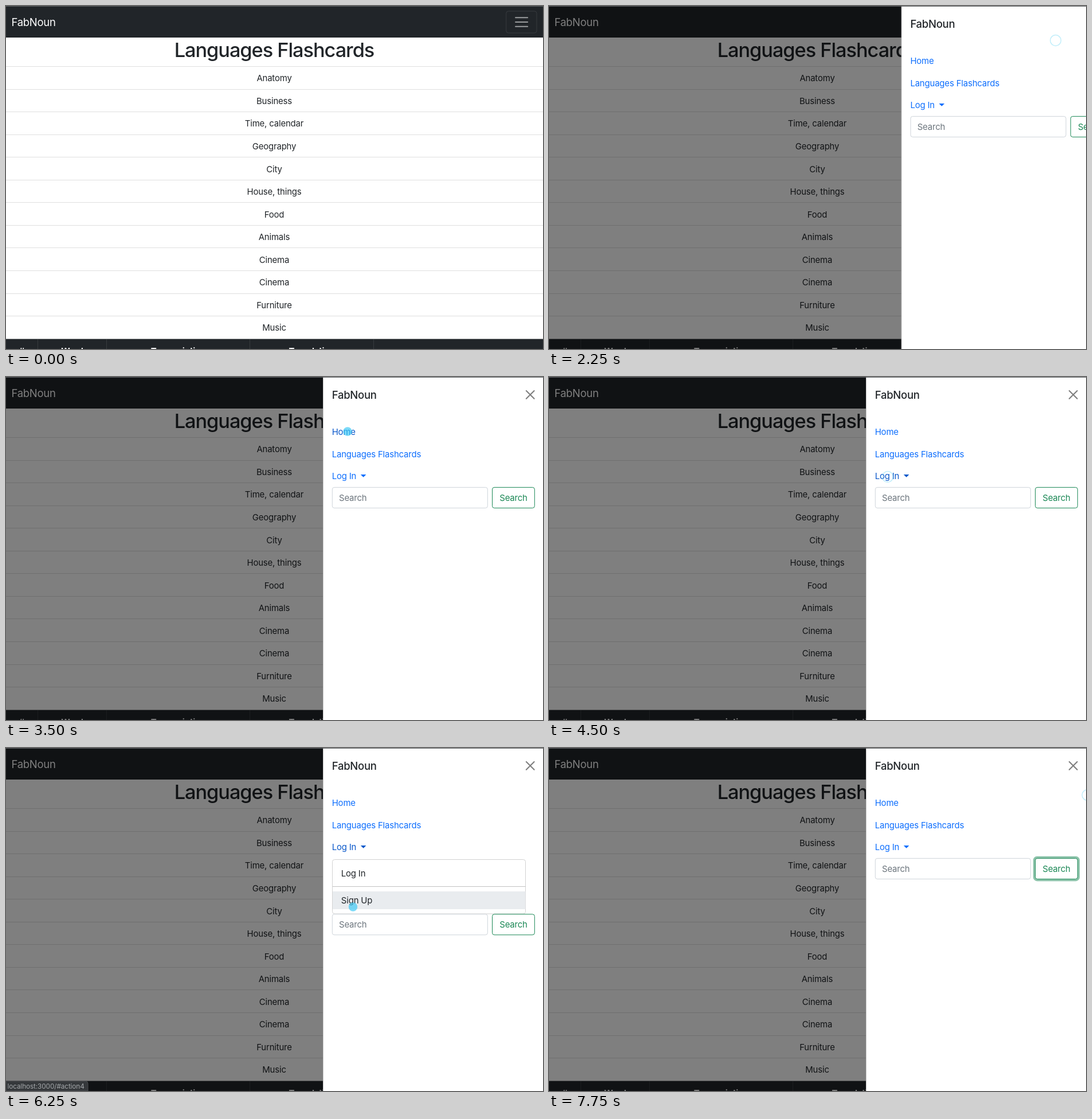
An HTML page for the animation above (8000 ms loop, 937 px wide and 598 px high).

```html
<!DOCTYPE html>
<html lang="en">
<head>
<meta charset="utf-8">
<title>Languages Flashcards</title>
<style>
  html, body { margin: 0; width: 100%; height: 100%; overflow: hidden; background: #fff; }
  svg { display: block; width: 100vw; height: 100vh; }
  text { font: 14.9px Inter, sans-serif; font-optical-sizing: none; letter-spacing: -.01em; fill: #212529; white-space: pre; }
  .mid { text-anchor: middle; }
  .title { font-size: 34.3px; font-weight: 500; letter-spacing: -.03em; }
  .brand { font-size: 18.5px; letter-spacing: -.015em; }
  .head { font-weight: 700; fill: #fff; }
  .link { fill: #0d6efd; }
  .link.on { fill: #0a58ca; }
  .hint { fill: #6c757d; }
  .status { font-size: 11.8px; fill: #a4a7aa; }
  .hover { fill: #e9ecef; }
</style>
</head>
<body>
<svg viewBox="0 0 937 598">
  <g id="page">
    <rect width="937" height="598" fill="#fff"/>
    <rect width="937" height="55" fill="#212529"/>
    <text class="brand" x="9.5" y="34.6" style="fill:#fff">FabNoun</text>
    <rect id="togglerFocus" x="870.8" y="7" width="57.2" height="42" rx="5.5" fill="none" stroke="#9b9d9f" stroke-width="3.9"/>
    <rect x="872.8" y="9" width="53.2" height="38" rx="3.9" fill="none" stroke="#fff" stroke-opacity=".1"/>
    <path d="M889 20.3h21.2M889 28h21.2M889 35.7h21.2" stroke="#9b9d9f" stroke-width="1.9" stroke-linecap="round"/>
    <text class="title mid" x="468" y="89.3">Languages Flashcards</text>
    <g id="rows"></g>
    <rect y="580.5" width="937" height="18" fill="#212529"/>
    <path d="M55.5 581v17M175.5 581v17M425.5 581v17M641.5 581v17" stroke="#373b3e"/>
    <g id="heads"></g>
  </g>
  <rect id="backdrop" width="937" height="598" opacity=".5"/>
  <g id="panel">
    <rect x="553" width="384" height="598" fill="#fff"/>
    <path d="M553.5 0v598" stroke="#000" stroke-opacity=".2"/>
    <text class="brand" x="568.7" y="37.6" style="font-weight:500">FabNoun</text>
    <path d="M907.8 24l13.8 13.8M921.6 24l-13.8 13.8" stroke="#7f7f7f" stroke-width="2.1" stroke-linecap="round"/>
    <text class="link" id="home" x="568.7" y="101.4">Home</text>
    <text class="link" id="cards" x="568.7" y="139.9">Languages Flashcards</text>
    <g class="link" id="login">
      <text class="link" x="568.7" y="178.4">Log In</text>
      <path d="M618.8 170h9.6l-4.8 4.8z"/>
    </g>
    <g id="menu">
      <rect x="569.5" y="194.5" width="337" height="94.5" rx="3.9" fill="#fff" stroke="#d2d2d2"/>
      <rect class="hover" id="item0" x="570" y="202.5" width="336.5" height="31"/>
      <rect class="hover" id="item1" x="570" y="250" width="336.5" height="31"/>
      <path d="M570 241.5h336.5" stroke="#c3c3c3"/>
      <text x="584.8" y="223.8">Log In</text>
      <text x="584.8" y="271.2">Sign Up</text>
    </g>
    <g id="search">
      <rect x="569.3" y="192.4" width="271" height="36" rx="3.6" fill="#fff" stroke="#ced4da"/>
      <text class="hint" x="581" y="216">Search</text>
      <rect id="searchFocus" x="846.7" y="190.6" width="77.4" height="39.6" rx="5" fill="none" stroke="#8cc3aa" stroke-width="3.9"/>
      <rect id="searchButton" x="848.5" y="192.4" width="73.8" height="36" rx="3.6" stroke="#198754"/>
      <text id="searchLabel" class="mid" x="885.5" y="216">Search</text>
    </g>
  </g>
  <g id="status">
    <path d="M0 581h139q4 0 4 4v13H0z" fill="#35383b" stroke="#484b4e"/>
    <text class="status" id="statusText" x="2.5" y="593.8"></text>
  </g>
  <path d="M0 .5h937" stroke="#5b5e61"/>
  <circle id="cursor"/>
</svg>
<script>
const LOOP = 8000;
const $ = id => document.getElementById(id);
const show = (id, on) => { $(id).style.display = on ? '' : 'none'; };
const label = (cls, x, y, text) => `<text class="${cls}" x="${x}" y="${y}">${text}</text>`;

const topics = ['Anatomy', 'Business', 'Time, calendar', 'Geography', 'City', 'House, things',
  'Food', 'Animals', 'Cinema', 'Cinema', 'Furniture', 'Music'];
$('rows').innerHTML = topics.map((topic, i) => {
  const y = 105.5 + i * 39.55;
  return `<path d="M0 ${Math.floor(y) + .5}h937" stroke="#dfdfdf"/>` + label('mid', 468, y + 25.8, topic);
}).join('');
$('heads').innerHTML = [['#', 27.5], ['Word', 115.5], ['Transcription', 300.5], ['Translation', 533.5]]
  .map(([text, x]) => label('head mid', x, 606.6, text)).join('');

// Pointer stops: time, x, y, pressed
const stops = [
  [500, 884.5, 42.5], [750, 884.5, 42.5, 1], [1250, 884, 60],
  [2750, 843, 81], [3000, 720, 120], [3250, 596, 95], [3500, 596, 95, 1],
  [3750, 594, 120], [4000, 592, 137], [4250, 592, 137, 1],
  [4500, 591, 174], [4750, 591, 174, 1], [5250, 591, 200],
  [5500, 600, 222], [5750, 600, 222, 1], [6000, 605.5, 277], [6250, 605.5, 277, 1],
  [6500, 605.5, 277], [6750, 740, 240], [7000, 885, 211], [7250, 885, 211, 1],
  [7500, 912, 150], [7750, 939.5, 82]
];

function drawCursor(t) {
  const stop = stops.findLast(s => s[0] <= t);
  show('cursor', stop);
  if (!stop) return;
  const [, x, y, pressed] = stop;
  const look = pressed
    ? { r: 7.7, fill: 'rgba(60,200,245,.68)', stroke: 'none' }
    : { r: 9.4, fill: 'none', stroke: 'rgba(80,205,240,.35)', 'stroke-width': 1.5 };
  for (const [name, value] of Object.entries({ cx: x, cy: y, ...look })) $('cursor').setAttribute(name, value);
}

function draw(t) {
  const during = (from, to = LOOP) => t >= from && t < to;

  show('togglerFocus', during(1750));
  $('togglerFocus').style.opacity = t < 2000 ? .5 : 1;
  show('backdrop', during(2250));
  show('panel', during(2250));
  $('panel').setAttribute('transform', `translate(${t < 2500 ? 61.7 : 0} 0)`);

  $('home').classList.toggle('on', during(3250, 3750));
  $('cards').classList.toggle('on', during(3750, 4500));
  $('login').classList.toggle('on', during(4500, 6750));
  $('login').firstElementChild.classList.toggle('on', during(4500, 6750));

  const open = during(5000, 6750);
  show('menu', open);
  show('item0', during(5500, 6000));
  show('item1', during(6000, 6750));
  $('search').setAttribute('transform', `translate(0 ${open ? 97.4 : 0})`);

  const filled = during(7000, 7500);
  show('searchFocus', during(7250));
  $('searchButton').style.fill = filled ? '#198754' : '#fff';
  $('searchLabel').style.fill = filled ? '#fff' : '#198754';

  const action = during(4250, 4500) ? 2 : during(5750, 6000) ? 3 : during(6000, 6750) ? 4 : 0;
  show('status', action);
  $('statusText').textContent = 'localhost:3000/#action' + action;

  drawCursor(t);
}

const start = performance.now();
function tick() {
  draw((performance.now() - start) % LOOP);
  requestAnimationFrame(tick);
}
tick();
</script>
</body>
</html>
```
